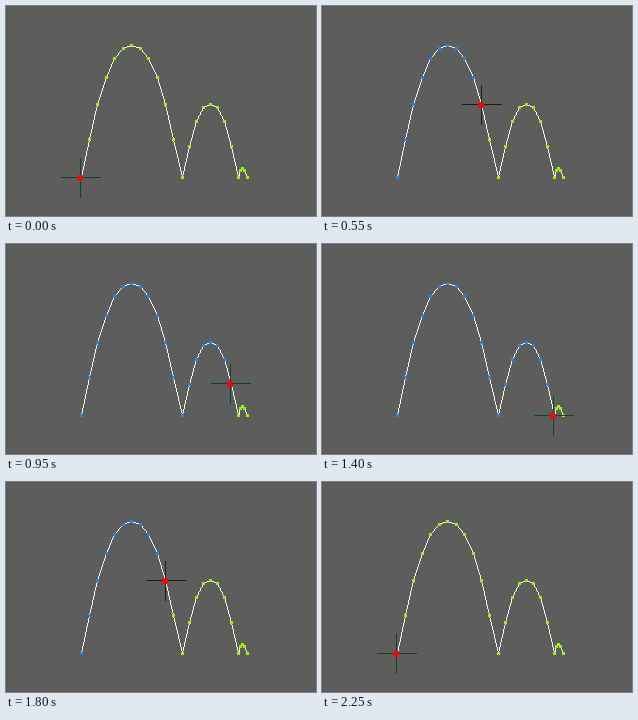
These frames come from a looping animation (310x210 px, 2.4 s). A matplotlib script:

```python
import numpy as np
import matplotlib.pyplot as plt
from matplotlib.animation import FuncAnimation
from matplotlib.patches import Rectangle

W, H, DPI = 310, 210, 100
STEP, LOOP = 50, 2400
GREY, GREEN, BLUE, RED = "#5d5d5b", "#99f500", "#1e86ff", "#ff0000"
DARK, TEAL = "#1c1c1c", "#06452f"
GROUND = 171.2


def bounce(x0, x1, height, n):
    """Points of one arch, a parabola with slightly fuller shoulders."""
    s = np.linspace(0, 1, n + 1)
    u = abs(2 * s - 1)
    lift = 1 - u**2 * (1 - 0.8 * (1 - u) * (0.64 - u))
    return np.column_stack([x0 + (x1 - x0) * s, GROUND - height * lift])


points = np.vstack([
    bounce(74.6, 175.94, 131.8, 12),
    bounce(175.94, 231.8, 73.4, 8)[1:],
    bounce(231.8, 240.6, 9, 4)[1:],
])
spots = np.rint(points).astype(int)

# The time slider is dragged forward, held, then dragged back
key_ms = [100, 150, 650, 1100, 1350, 1400, 1800, 1900, 1950, 2000, 2250]
key_pos = [0, 2, 12, 22, 22, 20, 10, 7, 7, 5, 0]


def trace(a, b):
    """Pixels of a one-pixel line from a to b."""
    n = max(abs(b - a))
    return np.rint(np.linspace(a, b, n + 1))


fig = plt.figure(figsize=(W / DPI, H / DPI), dpi=DPI, facecolor=GREY)
ax = fig.add_axes([0, 0, 1, 1])
ax.set(xlim=(0, W), ylim=(H, 0))
ax.axis("off")


def box(w, h, color, z, xy=(0, 0)):
    return ax.add_patch(Rectangle(xy, w, h, fc=color, lw=0,
                                  antialiased=False, zorder=z))


pixels = np.unique(np.vstack([trace(a, b) for a, b in zip(spots, spots[1:])]),
                   axis=0)
for x, y in pixels:
    box(1, 1, "white", 1, (x, y))

dots = [box(3, 3, GREEN, 2, (x - 1, y - 1)) for x, y in spots]
across, down = box(40, 1, DARK, 3), box(1, 40, DARK, 3)
wide, tall = box(6, 4, RED, 4), box(4, 6, RED, 4)


def update(frame):
    pos = int(np.rint(np.interp(frame * STEP, key_ms, key_pos)))
    x, y = np.floor(points[pos])
    for i, dot in enumerate(dots):
        dot.set_facecolor(BLUE if i < pos else GREEN)
    across.set_xy((x - 19, y))
    down.set_xy((x, y - 19))
    for line in (across, down):
        line.set_facecolor(TEAL if y > 130 else DARK)
    wide.set_xy((x - 3, y - 1))
    tall.set_xy((x - 2, y - 2))
    return [*dots, across, down, wide, tall]


anim = FuncAnimation(fig, update, frames=LOOP // STEP, interval=STEP,
                     repeat=True, repeat_delay=0, blit=False)
plt.show()
```
